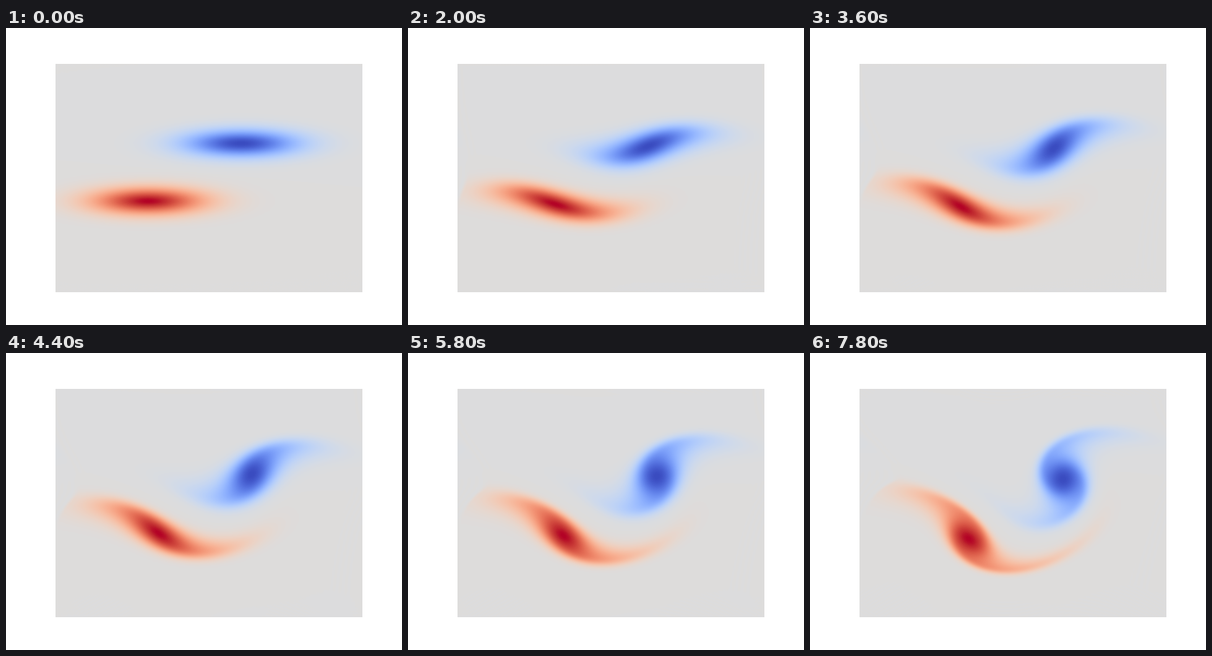
A matplotlib script that plays this animation: 640x480 px, repeating every 8000 ms.

```python
import numpy as np
import matplotlib.pyplot as plt
from matplotlib.animation import FuncAnimation

N = 192               # grid points per side of the periodic unit square
FRAMES = 40
SUBSTEPS = 3
DT = 10.0 / 39 / SUBSTEPS
SIGMA_X, SIGMA_Y = 0.133, 0.042

grid = (np.arange(N) + 0.5) / N
X, Y = np.meshgrid(grid, grid)

k = 2 * np.pi * np.fft.fftfreq(N, 1 / N)
KX, KY = np.meshgrid(k[:N // 2 + 1].copy(), k)
KX[:, -1] = np.pi * N
K2 = KX**2 + KY**2
K2[0, 0] = 1.0
kmax = np.pi * N
smooth = np.exp(-36 * (np.abs(KX) / kmax)**12 - 36 * (np.abs(KY) / kmax)**12)


def blob(x0, y0):
    return np.exp(-((X - x0) / SIGMA_X)**2 / 2 - ((Y - y0) / SIGMA_Y)**2 / 2)


def to_grid(spec):
    return np.fft.irfft2(spec, s=(N, N))


def rate(w):
    """Advection of vorticity by its own flow, in Fourier space."""
    psi = -w / K2
    u, v = to_grid(-1j * KY * psi), to_grid(1j * KX * psi)
    wx, wy = to_grid(1j * KX * w), to_grid(1j * KY * w)
    return -np.fft.rfft2(u * wx + v * wy) * smooth


def step(w):
    a = rate(w)
    b = rate(w + DT / 2 * a)
    c = rate(w + DT / 2 * b)
    d = rate(w + DT * c)
    return (w + DT / 6 * (a + 2 * b + 2 * c + d)) * smooth


def simulate():
    start = blob(0.302, 0.602) - blob(0.605, 0.350)
    fields = [start]
    w = np.fft.rfft2(start)
    for _ in range(FRAMES - 1):
        for _ in range(SUBSTEPS):
            w = step(w)
        fields.append(to_grid(w))
    return fields


fields = simulate()

fig = plt.figure(figsize=(6.4, 4.8), dpi=100, facecolor="white")
ax = fig.add_axes([0.125, 0.11, 0.775, 0.77])
ax.axis("off")
image = ax.imshow(fields[0], cmap="coolwarm", vmin=-1, vmax=1, aspect="auto",
                  extent=(0, 1, 1, 0), interpolation="bilinear")


def draw(i):
    image.set_data(fields[i])
    return (image,)


anim = FuncAnimation(fig, draw, frames=FRAMES, interval=200, repeat=True)
plt.show()
```
